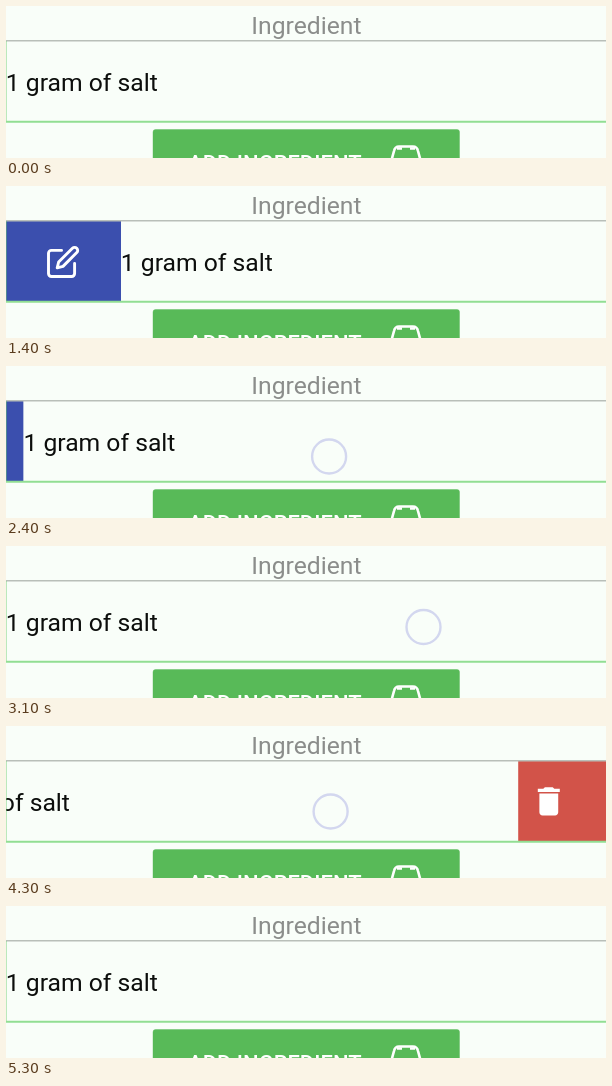
Animation of 600x152 px, one loop 5400 ms. Source, as an HTML page:

```html
<!DOCTYPE html>
<html lang="en">
<head>
<meta charset="utf-8">
<title>Swipe row</title>
<style>
html, body { margin: 0; width: 100%; height: 100%; overflow: hidden; background: #f9fef9; }
svg { display: block; width: 600px; height: 152px; }
text { font-family: Roboto, sans-serif; font-size: 24.7px; }
.caps { font-size: 22px; font-weight: 500; }
</style>
</head>
<body>
<svg viewBox="0 0 600 152">
  <rect width="600" height="152" fill="#f9fef9"/>
  <text x="300.4" y="28.3" text-anchor="middle" fill="#8b8d8b">Ingredient</text>

  <rect id="edit" y="35" height="81" fill="#3b4fae"/>
  <g transform="translate(57 76) scale(1.45) translate(-12 -12)" fill="none" stroke="#fff" stroke-width="2" stroke-linecap="round" stroke-linejoin="round">
    <path d="M11 4H4a2 2 0 0 0-2 2v14a2 2 0 0 0 2 2h14a2 2 0 0 0 2-2v-7"/>
    <path d="M18.5 2.5a2.12 2.12 0 0 1 3 3L12 15l-4 1 1-4z"/>
  </g>
  <rect id="del" y="35" height="81" fill="#d25349"/>
  <path transform="translate(542.8 75.3) scale(1.57) translate(-12 -12)" fill="#fff"
    d="M6 19c0 1.1.9 2 2 2h8c1.1 0 2-.9 2-2V7H6zM19 4h-3.5l-1-1h-5l-1 1H5v2h14z"/>

  <g id="row">
    <rect y="35" width="600" height="81" fill="#f9fef9"/>
    <text x="-.2" y="84.5" fill="#0c0e0c">1 gram of salt</text>
  </g>
  <path d="M0 34.7H600" stroke="#b9bfb9" stroke-width="1.5"/>
  <path d="M.5 35V116" stroke="#6fcf72" stroke-opacity=".45"/>
  <path d="M0 115.8H600" stroke="#92de93" stroke-width="2"/>

  <rect x="147" y="123.5" width="306.5" height="50" rx="2.5" fill="#58ba58" stroke="#58ba58" stroke-opacity=".4"/>
  <text class="caps" x="182" y="164.8" fill="#fff">ADD INGREDIENT</text>
  <g fill="none" stroke="#fff" stroke-width="2.6">
    <path d="M385 156L388 145Q389 140.500 393 140.500H407Q411 140.500 412 145L415 156"/>
    <path d="M391 142.500H396M404 142.500H409"/>
  </g>

  <circle id="touch" r="17" fill="none" stroke="#d3d7ef" stroke-width="2.4"/>
</svg>
<script>
const LOOP = 5400, STEP = 100;
const DRAG = 615;   // duration of one swipe
const OPEN = 115;   // width of an opened action

// start time, direction, and where the finger lands
const swipes = [
  { at: 575, dir: 1, x: 277, y: 60.5 },
  { at: 1937, dir: -1, x: 420.5, y: 90.5 },
  { at: 3115, dir: -1, x: 417.5, y: 81 },
  { at: 4106, dir: 1, x: 297.5, y: 85.5 }
];

const $ = id => document.getElementById(id);

function set(id, attrs) {
  for (const name in attrs) $(id).setAttribute(name, attrs[name]);
}

function ease(u) {
  u = Math.min(1, Math.max(0, u));
  return u * u * (3 - 2 * u);
}

function draw(ms) {
  const t = Math.floor(ms % LOOP / STEP) * STEP;
  const moved = s => s.dir * OPEN * ease((t - s.at) / DRAG);
  const x = swipes.reduce((sum, s) => sum + moved(s), 0);
  const held = swipes.find(s => t > s.at - STEP && t < s.at + DRAG * 0.85);

  set('row', { transform: `translate(${x} 0)` });
  set('edit', { width: Math.max(0, x) });
  set('del', { x: 600 + Math.min(0, x), width: Math.max(0, -x) });
  set('touch', { visibility: held ? 'visible' : 'hidden' });
  if (held) set('touch', { cx: held.x + moved(held), cy: held.y });
}

const start = performance.now();
function tick() {
  draw(performance.now() - start);
  requestAnimationFrame(tick);
}
tick();
</script>
</body>
</html>
```
